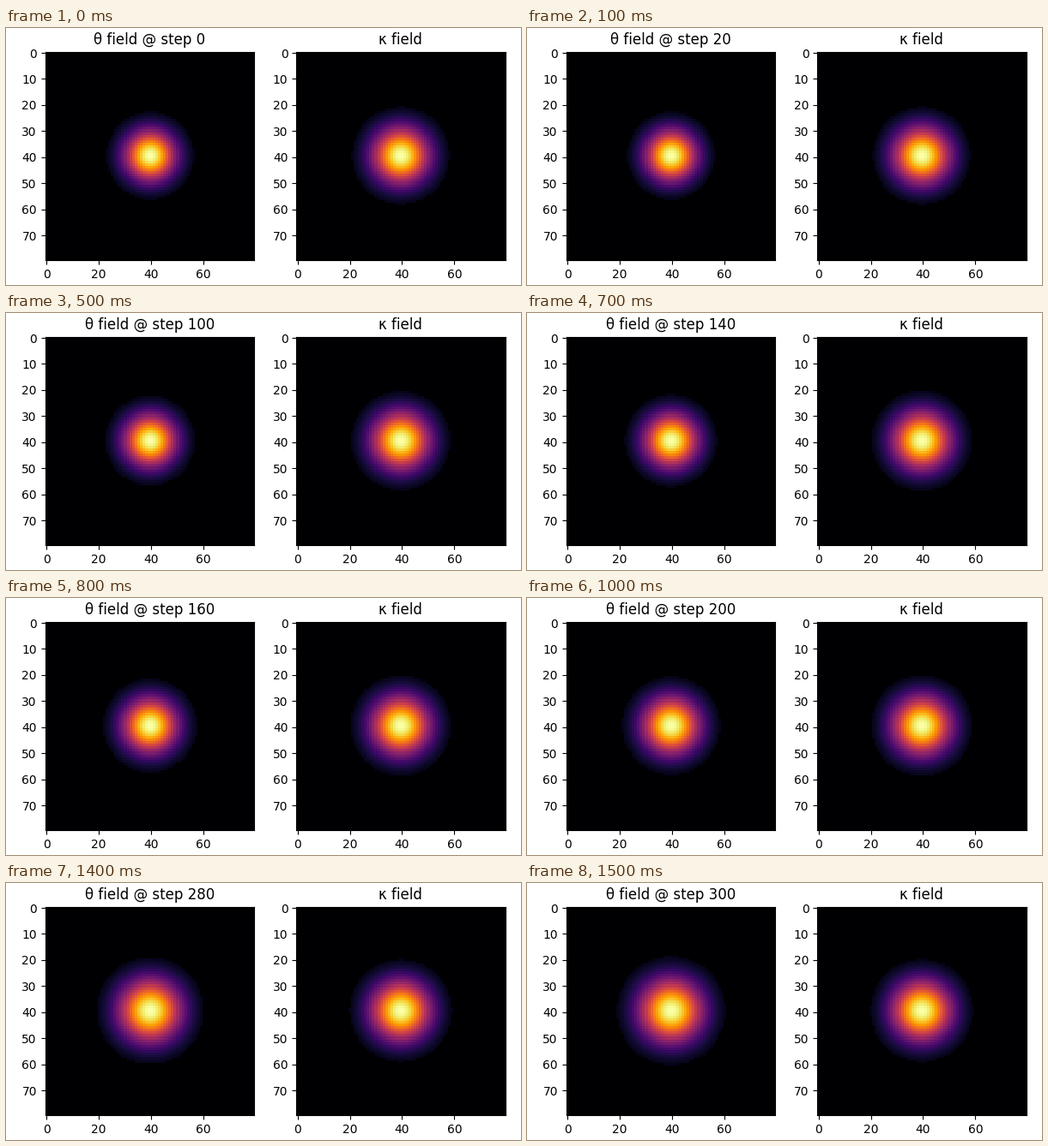
Animation of 600x300 px, one loop 1.6 s. Source, as a matplotlib script:

```python
import numpy as np
import matplotlib.pyplot as plt
from matplotlib.animation import FuncAnimation

N = 80
FRAMES = 16
STEP = 20
FLOOR = 0.045  # values below this read as empty background

axis = np.arange(N) - (N - 1) / 2
X, Y = np.meshgrid(axis, axis)
R2 = X**2 + Y**2


def blob(radius):
    """Gaussian that falls to FLOOR at the given radius, in cells."""
    field = np.exp(np.log(FLOOR) * R2 / radius**2)
    field[field < FLOOR] = 0
    return field / field.max()


def theta(step):
    return blob(16.6 + 5.1 / (1 + np.exp((220 - step) / 55)))


def kappa(step):
    return blob(18.6 + step / 300)


fig, (left, right) = plt.subplots(1, 2, figsize=(6, 3), dpi=100)
theta_img = left.imshow(theta(0), cmap="inferno", vmin=0, vmax=1)
kappa_img = right.imshow(kappa(0), cmap="inferno", vmin=0, vmax=1)
title = left.set_title("θ field @ step 0")
right.set_title("κ field")
fig.tight_layout()


def update(frame):
    step = frame * STEP
    theta_img.set_data(theta(step))
    kappa_img.set_data(kappa(step))
    title.set_text(f"θ field @ step {step}")
    return theta_img, kappa_img, title


anim = FuncAnimation(fig, update, frames=FRAMES, interval=100,
                     repeat=True, repeat_delay=0, blit=False)
plt.show()
```
